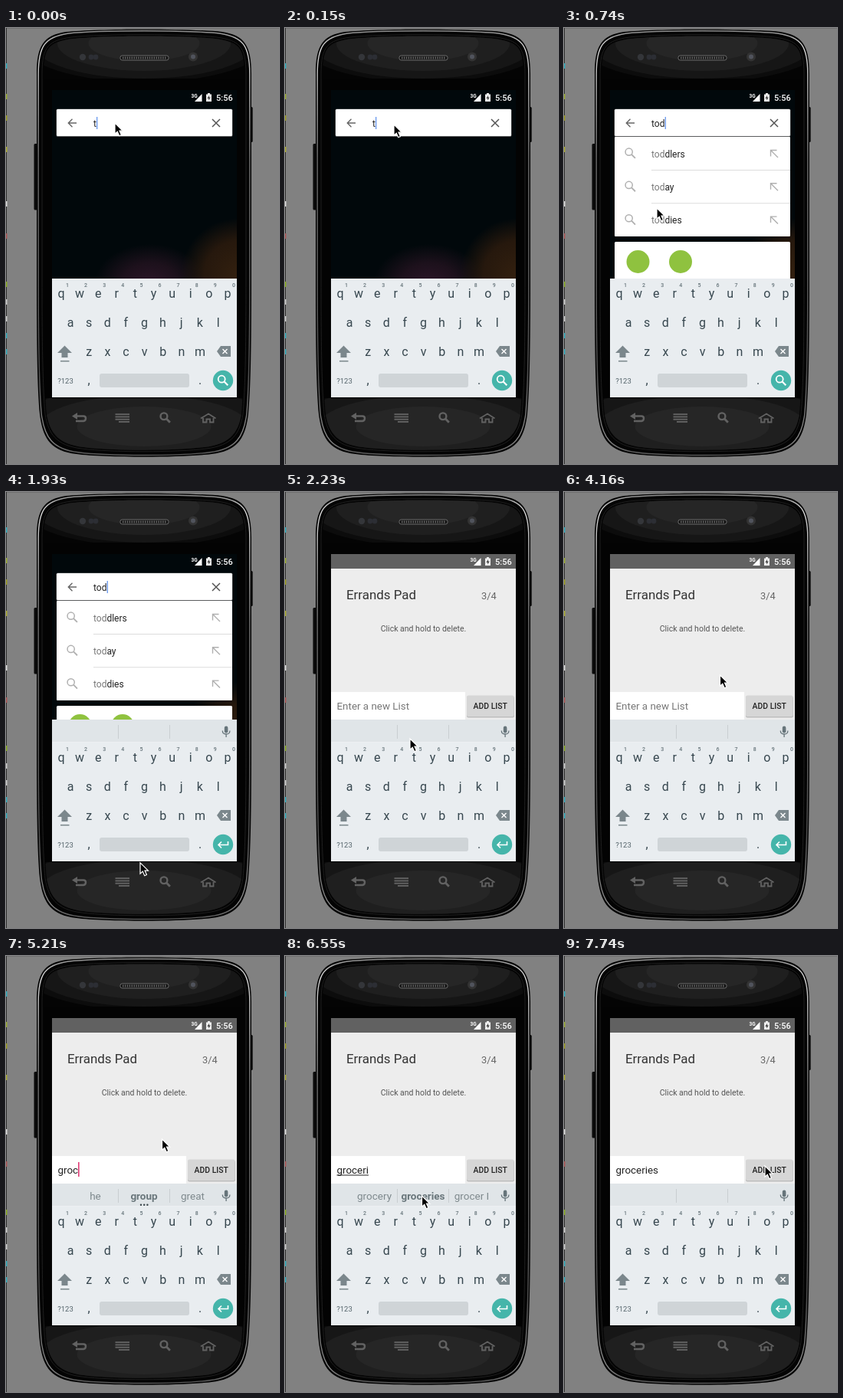
Write an HTML page that moves like this. It is 356 by 569 pixels and loops after 8 s.

```html
<!DOCTYPE html>
<html lang="en">
<head>
<meta charset="utf-8">
<title>Phone demo</title>
<style>
html, body { margin: 0; width: 100%; height: 100%; overflow: hidden; background: #818181; }
svg { display: block; width: 100%; height: 100%; }
text { font-family: Roboto, "Noto Sans", sans-serif; white-space: pre; }
</style>
</head>
<body>
<svg id="stage" viewBox="0 0 356 569"></svg>
<script>
const LOOP = 8000, TICK = 148.75;
const stage = document.getElementById('stage');

const rect = (x, y, w, h, fill, more = '') =>
  `<rect x="${x}" y="${y}" width="${w}" height="${h}" fill="${fill}" ${more}/>`;
const circle = (x, y, r, fill, more = '') =>
  `<circle cx="${x}" cy="${y}" r="${r}" fill="${fill}" ${more}/>`;
const oval = (x, y, rx, ry, fill) =>
  `<ellipse cx="${x}" cy="${y}" rx="${rx}" ry="${ry}" fill="${fill}"/>`;
const line = (d, color, width = 1.5, more = '') =>
  `<path d="${d}" fill="none" stroke="${color}" stroke-width="${width}" ${more}/>`;
const shape = (d, fill, more = '') => `<path d="${d}" fill="${fill}" ${more}/>`;
const text = (s, x, y, size, fill, more = '') =>
  `<text x="${x}" y="${y}" font-size="${size}" fill="${fill}" ${more}>${s}</text>`;
const group = (id, body) => `<g id="${id}">${body}</g>`;
const mid = 'text-anchor="middle"';
const lens = (x, y, r, color, w) =>
  circle(x - r * .4, y - r * .4, r, 'none', `stroke="${color}" stroke-width="${w}"`) +
  line(`M${x + r * .3} ${y + r * .3}l${r * 1.1} ${r * 1.1}`, color, w * 1.2);

// Phone outline, shrunk by i pixels on every side
function shell(i) {
  const l = 40 + i, r = 320 - i, t = 1.5 + i, b = 560 - i;
  return `M${l} 60C${l} 23 ${l + 9} ${t + 8} ${l + 38} ${t + 3.5}
    C${l + 80} ${t - 1} ${r - 80} ${t - 1} ${r - 38} ${t + 3.5}
    C${r - 9} ${t + 8} ${r} 23 ${r} 60L${r} 330C${r} 420 ${r - 1} 470 ${r - 4} 504
    C${r - 8} ${b - 24} ${r - 18} ${b - 8} ${r - 52} ${b - 4}
    C${r - 90} ${b + 1} ${l + 90} ${b + 1} ${l + 52} ${b - 4}
    C${l + 18} ${b - 8} ${l + 8} ${b - 24} ${l + 4} 504C${l + 1} 470 ${l} 420 ${l} 330Z`;
}

function defs() {
  const stops = list => list.map(([o, c, a = 1]) =>
    `<stop offset="${o}" stop-color="${c}" stop-opacity="${a}"/>`).join('');
  const radial = (id, list) => `<radialGradient id="${id}">${stops(list)}</radialGradient>`;
  return `<defs>
    <linearGradient id="rim" x1="0" y1="0" x2="0" y2="1">${stops([[0, '#8a8a8a'], [.04, '#dcdcdc'],
      [.14, '#a8a8a8'], [.3, '#6a6a6a'], [.8, '#505050'], [.96, '#8a8a8a'], [1, '#555']])}</linearGradient>
    ${radial('plum', [[0, '#2b1627'], [.5, '#1d111c'], [1, '#1d111c', 0]])}
    ${radial('rust', [[0, '#33200f'], [.6, '#26180d'], [1, '#26180d', 0]])}
    <clipPath id="body"><path d="${shell(9)}"/></clipPath>
    <clipPath id="screen">${rect(60, 81, 241, 401, '#000')}</clipPath>
  </defs>`;
}

function phone() {
  const specks = [[46, '#3ab'], [86, '#9a3'], [114, '#992'], [155, '#aa3'], [226, '#ddd'],
    [268, '#a55'], [331, '#8a2'], [354, '#ccc'], [376, '#ccc'], [398, '#3ab'], [419, '#3ab']]
    .map(([y, c]) => rect(0, y, 1.5, 7, c)).join('');
  const grille = Array.from({ length: 20 }, (_, i) =>
    rect(152 + i * 2.9, 37.5, 1.4, 3, '#666')).join('');
  const bands = [['#0c0c0c', 1.1], ['#161616', 1], ['#1f1f1f', .78], ['#262626', .5]].map(([c, k]) =>
    oval(180, 20, 145 * k, 46 * k, c) + oval(180, 520, 175 * k, 52 * k, c)).join('');
  const nav = '#626262';
  return rect(0, 0, 356, 569, '#818181') + rect(0, 0, 356, 1, '#707070') +
    rect(0, 0, 1, 569, '#303030') + specks +
    rect(36.5, 151, 5, 86.5, '#0a0a0a', 'rx="1.5"') + rect(317, 103, 4.7, 46, '#0a0a0a', 'rx="1.5"') +
    shape(shell(0), '#040404') + line(shell(2.2), 'url(#rim)', 1.4) +
    line(shell(7), '#262626', .8) +
    `<g clip-path="url(#body)">${bands}${rect(40, 66, 280, 417, '#030303')}</g>` +
    rect(149, 36, 63, 6, '#151515', 'rx="2.5" stroke="#6c6c6c" stroke-width="1"') + grille +
    circle(100, 38, 4.2, '#34363a') + circle(111, 38, 3.4, '#2c2e34') + circle(117, 38, 3.4, '#2c2e34') +
    circle(244, 37.5, 6, '#333') + circle(244, 37.5, 3, '#50535c') +
    line('M91 506.5H101Q104 506.5 104 509.5T101 513H91', nav, 2.4) +
    shape('M86 506.5L93 502V511Z', nav) +
    [504, 507.3, 510.6].map(y => rect(142.5, y - .8, 18.5, 1.9, nav)).join('') +
    rect(147, 513, 14, 1.9, nav) +
    lens(207.7, 508.5, 4.4, nav, 2.4) +
    line('M254 509.5L264 503.5L273.5 509.5M257 509V514.5H261.5V510.5H266V514.5H270.5V509', nav, 1.8);
}

const wallpaper = () => rect(60, 81, 241, 401, '#01080b') +
  oval(188, 332, 72, 50, 'url(#plum)') + oval(304, 322, 76, 74, 'url(#rust)');

const status = () => text('3G', 241.5, 90.5, 6.5, '#fff', 'font-weight="700"') +
  shape('M246 96L255.5 86V96Z', '#fff') +
  shape('M261 86.5h2v-1.5h3v1.5h2V96h-7Z', '#eee') +
  shape('M265 88l-2.6 4h1.8v2.6l2.6-4h-1.8Z', '#444') +
  text('5:56', 274, 95.3, 11, '#fff', 'font-weight="500"');

function suggestion(rest, i) {
  const y = 163.5 + i * 43.3;
  return lens(86.5, y, 4.6, '#b0b0b0', 1.5) +
    text(`<tspan fill="#777">tod</tspan>${rest}`, 114, y + 5, 12, '#222') +
    line(`M279 ${y + 5.5}L270 ${y - 3.5}M269.5 ${y + 4}V${y - 4}H277.5`, '#b0b0b0', 1.4) +
    (i < 2 ? rect(114, y + 21.5, 181, 1, '#dcdcdc') : '');
}

const search = () => rect(65.5, 105.5, 230, 36.5, '#5a5c5d', 'rx="2"') +
  rect(66, 106, 229, 35, '#fff', 'rx="1.5"') +
  line('M92 124H81.5M86.5 118.8L81.3 124L86.5 129.2', '#666', 1.4) +
  line('M269 119l10 10M279 119l-10 10', '#555', 1.5) +
  text('', 114, 129, 12, '#222', 'id="query"') + rect(0, 116, 1, 16, '#3a78e8', 'id="mark"') +
  group('results', rect(66, 142, 229, 130, '#fff', 'rx="1"') +
    ['dlers', 'ay', 'dies'].map(suggestion).join('') +
    rect(66, 279, 229, 60, '#fff', 'rx="1.5"') +
    circle(96.5, 305, 15, '#8fc23f') + circle(152, 305, 15, '#8fc23f'));

const app = () => rect(60, 81, 241, 19, '#616161') + rect(60, 100, 241, 200, '#ededed') +
  text('Errands Pad', 80, 140, 16.9, '#333') + text('3/4', 256, 140, 12.8, '#666') +
  text('Click and hold to delete.', 180.5, 182, 10.5, '#555', mid) +
  rect(60, 261, 175, 36, '#fff') +
  rect(237, 267, 62, 27.5, '#bdbdbd', 'rx="2"') + rect(237, 265.5, 61.5, 27.5, '#d6d6d6', 'rx="2"') +
  text('ADD LIST', 267.7, 283, 10.4, '#222', mid + ' font-weight="500"') +
  text('', 67.5, 284, 13.4, '#222', 'id="entry"') +
  rect(67.5, 285.5, 41.5, 1, '#222', 'id="under"') +
  rect(67.5, 269, 1.5, 19, '#e0306e', 'id="caret"');

function keyboard() {
  const ink = '#37474f', soft = '#7b878c';
  const row = (keys, x, y) => [...keys].map((k, i) =>
    text(k, x + i * 24.1, y, 16, ink, mid)).join('');
  const digits = [...'1234567890'].map((d, i) =>
    text(d, 80 + i * 24.1, 338, 7, '#66747a', mid + ' font-weight="500"')).join('');
  return rect(60, 327, 241, 155, '#e9edf0') + digits +
    row('qwertyuiop', 72, 352) + row('asdfghjkl', 84, 390) + row('zxcvbnm', 108.3, 428) +
    shape('M76.5 414.5L86 424H80.5V430H72.5V424H67Z', soft) + rect(71, 434, 11.5, 1.5, soft) +
    shape('M275 422L280 415H293V429H280Z', soft) +
    line('M282.5 419l6 6M288.5 419l-6 6', '#fff', 1.4) +
    text('?123', 77.5, 463.5, 9.5, '#55646b', mid) + text(',', 108, 465, 16, ink, mid) +
    rect(122, 451, 117, 18, '#cfd4d7', 'rx="3"') + text('.', 253, 465, 16, ink, mid) +
    circle(283, 460, 13.2, '#45b5aa') +
    group('find', lens(283, 460, 4.5, '#fff', 1.8)) +
    group('enter', line('M289.5 456V460.5H277.5M281 456.5L277 460.5L281 464.5', '#fff', 1.6));
}

const strip = () => rect(60, 297, 241, 30, '#e0e5e8') + rect(60, 326, 241, 1, '#edf0f2') +
  rect(146, 304, 1, 18, '#c9ced1') + rect(213, 304, 1, 18, '#c9ced1') +
  [116.5, 180, 243.5].map((x, i) => text('', x, 318, 13.5, i === 1 ? '#69767b' : '#7e898d',
    `${mid} class="hint" font-weight="${i === 1 ? 700 : 400}"`)).join('') +
  group('more', [176, 180.2, 184.4].map(x => circle(x, 324.7, 1.2, '#3b464b')).join('')) +
  rect(284.8, 305.5, 4.6, 9, '#66747a', 'rx="2.3"') +
  line('M282.3 311.5Q282.3 316 287.1 316T291.9 311.5M287.1 316V320', '#66747a', 1.3);

const pointer = () => shape('M0 0V14.2L3.3 11.2L5.7 16.8L8.4 15.6L6 10.2H10.4Z', '#000',
  'stroke="#fff" stroke-width="1.2" id="pointer"');

stage.innerHTML = defs() + phone() + `<g clip-path="url(#screen)">` + wallpaper() +
  group('search', search()) + group('app', app()) + status() + keyboard() +
  group('strip', strip()) + '</g>' + pointer();

const $ = id => document.getElementById(id);
const hints = [...document.querySelectorAll('.hint')];
const show = (id, on) => $(id).setAttribute('visibility', on ? 'inherit' : 'hidden');

const path = [[0, 142, 124], [150, 142, 126], [744, 121, 235], [1190, 103, 304], [1488, 103, 304],
  [1934, 175, 484], [2380, 157, 241], [2678, 120, 287], [2826, 120, 287], [2975, 123, 409],
  [3272, 136, 508], [3867, 203.5, 239], [6099, 203.5, 239], [6545, 178.5, 313],
  [7140, 178.5, 313], [7735, 262, 274]];
const queries = [[0, 't'], [300, 'to'], [450, 'tod']];
const entries = [[0, ''], [4760, 'g'], [4910, 'gr'], [5060, 'gro'], [5210, 'groc'],
  [5360, 'groce'], [5500, 'grocer'], [5800, 'groceri'], [6840, 'groceries']];
const words = [[0, '||'], [5060, 'he|group|great'], [5500, 'grow|grocery|group'],
  [5950, 'grocery|groceries|grocer I'], [6990, '||']];

const latest = (list, t) => list.filter(e => e[0] <= t + 6).pop()[1];

function pointAt(t) {
  const i = path.findIndex(p => p[0] > t);
  if (i < 0) return path[path.length - 1].slice(1);
  const [a, b] = [path[i - 1], path[i]];
  const f = (t - a[0]) / (b[0] - a[0]);
  return [1, 2].map(n => a[n] + (b[n] - a[n]) * f);
}

function caretOn(t) {
  if (t < 4755) return Math.floor((t - 2660) / 500) % 2 === 0;
  return t < 6245 || (t > 6835 && t < 7280);
}

function draw(time) {
  const t = Math.floor((time + 6) / TICK) * TICK;
  const opened = t >= 2075, typing = t >= 1780;
  show('search', !opened);
  show('app', opened);
  show('results', t >= 590);
  show('strip', typing);
  show('enter', typing);
  show('find', !typing);

  const query = $('query');
  query.textContent = latest(queries, t);
  $('mark').setAttribute('x', 114.3 + query.getComputedTextLength());

  const entry = $('entry'), value = latest(entries, t);
  entry.textContent = value || 'Enter a new List';
  entry.setAttribute('fill', value ? '#222' : '#777');
  $('caret').setAttribute('x', 67.5 + (value ? entry.getComputedTextLength() : 0));
  show('caret', opened && caretOn(t));
  show('under', t >= 5940 && t < 6835);

  const list = latest(words, t);
  list.split('|').forEach((w, i) => hints[i].textContent = w);
  show('more', typing && list.startsWith('he'));

  const [x, y] = pointAt(t);
  $('pointer').setAttribute('transform', `translate(${x.toFixed(1)} ${y.toFixed(1)})`);
}

const start = performance.now();
function loop() {
  draw((performance.now() - start) % LOOP);
  requestAnimationFrame(loop);
}
loop();
</script>
</body>
</html>
```
